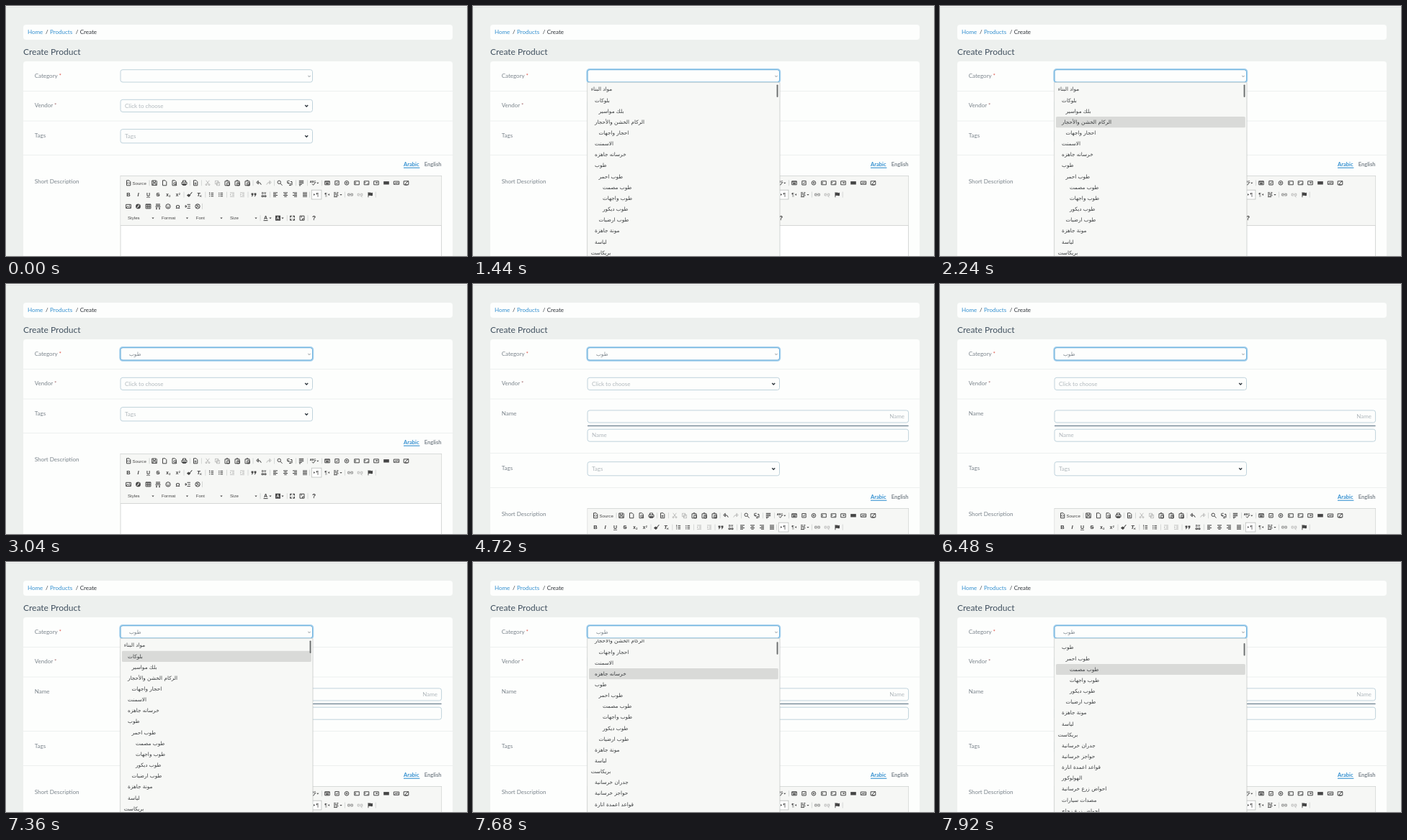
An HTML page for the animation above (8 s loop, 640 by 348 pixels).

```html
<!DOCTYPE html>
<html lang="en">
<head>
<meta charset="utf-8">
<title>Create Product</title>
<style>
html, body { margin: 0; width: 100%; height: 100%; overflow: hidden; background: #edf0ee; }
svg { display: block; width: 100%; height: 100%; }
text { font: 8px Lato, sans-serif; fill: #7b848c; }
.link { fill: #3490d0; }
.dark { fill: #2b3036; }
.hint { fill: #b1b8bd; }
.tab { font-size: 7.5px; font-weight: 700; }
.ar { font: 7.3px "DejaVu Sans", "Noto Sans", sans-serif; fill: #3a3d3f; }
.ed { font: 6.1px "Liberation Sans", Arial, sans-serif; fill: #484848; }
.ic { fill: none; stroke: #454545; stroke-width: 1; }
.ic.solid { fill: #454545; stroke: none; }
.pale { opacity: .3; }
.field { fill: #fdfefd; stroke: #b9cfd9; stroke-width: .9; }
.line { stroke: #edf0ef; stroke-width: 1; }
.sep { stroke: #cfd1d0; stroke-width: .8; }
</style>
</head>
<body>
<svg id="stage" viewBox="0 0 640 348" xmlns="http://www.w3.org/2000/svg"></svg>
<script>
const LOOP = 8000, STEP = 80;
const ROW = 15.15, LIST_TOP = 108.6, SHIFT = 76;

const rect = (x, y, w, h, extra = '') =>
  `<rect x="${x}" y="${y}" width="${w}" height="${h}" ${extra}/>`;
const text = (x, y, s, cls = '', extra = '') =>
  `<text x="${x}" y="${y}" class="${cls}" ${extra}>${s}</text>`;
const path = (d, extra) => `<path d="${d}" ${extra}/>`;
const field = (x, y, w, h) => rect(x, y, w, h, 'rx="3" class="field"');
const rule = y => path(`M24 ${y}H620`, 'class="line"');
const chevron = (x, y) => path(`M${x - 2} ${y - 1}l2 2 2-2`,
  'fill="none" stroke="#30383f" stroke-width="1.4"');
const icon = (x, y, d, cls = '') =>
  path(d, `class="ic ${cls}" transform="translate(${x} ${y})"`);
const seps = (y, list) => list.map(x => path(`M${x} ${y - 4}v8`, 'class="sep"')).join('');
const arrow = (x, y) => icon(x, y, 'M-1.6-.6h3.2l-1.6 1.8z', 'solid');
const glyph = (x, y, s, size, extra = '') =>
  text(x, y, s, 'ed', `text-anchor="middle" style="font-size:${size}px;fill:#3d3d3d;${extra}"`);

const page = 'M-2.5-3.5h3.5l1.8 1.8v5.2h-5.3z';
const clip = 'M-3-2.5h6v6h-6zM-1.2-3.5h2.4M-.2-.3h3.5v3.8h-3.5z';
const box = 'M-3.3-2.5h6.6v5h-6.6z';
const turn = 'M3.3 2.5q-.5-3.5-4.8-3.3M-.8-3l-2.5 2.3 2.5 2.3z';
const chain = 'M-.5-1.4h-2.8v2.8h2.8M.5-1.4h2.8v2.8h-2.8M-1.7 0h3.4';
const bars = (a, b) => `M-3-2.7h6M${a}-.9h${b}M-3 .9h6M${a} 2.7h${b}`;
const circle = r => `M${-r} 0a${r} ${r} 0 1 0 ${2 * r} 0a${r} ${r} 0 1 0 ${-2 * r} 0z`;

function rowOne(y) {
  return icon(170, y, page + 'M-.5-1l-1 1.2 1 1.2M.8-1l1 1.2-1 1.2') + text(175.5, y + 2.2, 'Source', 'ed') +
    icon(206, y, 'M-3.3-3.3h5.8l.8.8v5.8h-6.6zM-1.7-3v2.2h3.2v-2.2M-2 3v-2.2h4v2.2') +
    icon(220, y, page) +
    icon(233.5, y, page + 'M-.5.8a1.5 1.5 0 1 0 3 0a1.5 1.5 0 1 0-3 0M2 2l1.6 1.6') +
    icon(247.5, y, 'M-3.5-1h7v3h-7zM-2-1v-2.3h4v2.3M-2 3.2h4v-2h-4z') +
    icon(263, y, page + 'M-1.3 0h2.6M-1.3 1.6h2.6') +
    icon(280, y, 'M-2.3-3.5l3.6 5M2.3-3.5l-3.6 5M-3 2.4a1 1 0 1 0 2 0a1 1 0 1 0-2 0M1 2.4a1 1 0 1 0 2 0a1 1 0 1 0-2 0', 'pale') +
    icon(293.5, y, 'M-3-3h4v4.5h-4zM-1-1h4v4.5h-4z', 'pale') +
    icon(307, y, clip) + icon(321, y, clip + 'M.8 1h1.8') + icon(335, y, clip + 'M.8 2h1.8') +
    icon(351, y, turn) +
    `<g transform="translate(365 ${y}) scale(-1 1)">${icon(0, 0, turn, 'pale')}</g>` +
    icon(380, y, 'M-3-1a2.2 2.2 0 1 0 4.4 0a2.2 2.2 0 1 0-4.4 0M1 .8l2.5 2.6', '" stroke-width="1.4') +
    icon(394, y, 'M-3.3-3v3.2h2M-2.6-3h2.2M1-1.8h2v4.8M-.5 1.5h2.8M-1 3.3h3M-2-1l1 1.3-1 1.2') +
    icon(410, y, 'M-3.2-3h6.4M-3.2-1.3h6.4M-3.2.4h6.4M-3.2 2.1h4M-3 3.6h2') +
    glyph(426, y - .3, 'ABC', 4, 'font-weight:700') + icon(427, y, 'M-2 1.2l1.6 1.8 3.2-4') + arrow(432.8, y) +
    icon(446, y, box + 'M-3-1.5h6M-2 0h4M-2 1.4h4') +
    icon(459.5, y, 'M-2.7-2.7h5.4v5.4h-5.4zM-1.4 0l1.1 1.2 1.8-2.3') +
    icon(473, y, circle(2.8) + circle(.9)) +
    icon(487, y, box + 'M-1.8-1.4v2.8') +
    icon(500.5, y, box + 'M-1.8-1.2v1.6M1 1.8l1.6-1.6') +
    icon(514, y, box + 'M-.5-.5h2.2l-1.1 1.2z') +
    icon(528, y, 'M-3.8-2.2h7.6v4.4h-7.6z', 'solid') +
    icon(542, y, 'M-3.7-2.2h7.4v4.2h-7.4zM-2.5 1.2l1.5-1.6 1.2 1 1.2-1.3 1.3 1.6') +
    icon(555.5, y, 'M-3.3-2.5h6.6v5h-6.6zM-1.5 1.8l4.6-5M-2 2.8l4 0') +
    seps(y, [199, 255.5, 271.5, 343, 372.5, 402.5, 418.5, 438.5]);
}

function rowTwo(y) {
  const b = y + 2.6, list = 'M-.5-2.2h3.6M-.5 0h3.6M-.5 2.2h3.6';
  const dent = 'M-3-2.7h6M0-.9h3M0 .9h3M-3 2.7h6';
  return glyph(170, b, 'B', 7.5, 'font-weight:700') +
    glyph(183.5, b, 'I', 7.5, 'font-weight:700;font-style:italic') +
    glyph(197.5, b - .3, 'U', 7, 'font-weight:700;text-decoration:underline') +
    glyph(211, b, 'S', 7.5, 'font-weight:700;text-decoration:line-through') +
    glyph(224, b - .4, 'x', 6.5, 'font-weight:700') + glyph(227.2, b + 1, '2', 3.8, 'font-weight:700') +
    glyph(237.6, b, 'x', 6.5, 'font-weight:700') + glyph(240.8, b - 2.6, '2', 3.8, 'font-weight:700') +
    icon(254.5, y, 'M3.4-3.6l-3 3.6-1.7-1.1-2.3 2.3 3 2.2 2.3-2.2-.4-1 3-3.2z', 'solid') +
    glyph(267.3, b, 'T', 7.5, 'font-style:italic;font-weight:700') + icon(270.2, y + 2, 'M-1-1l2 2M1-1l-2 2') +
    icon(285, y, list + 'M-2.4-3.2v1.8M-3-.2h1.2M-3 2.2h1.2') +
    icon(298, y, list + 'M-3-2.2h1.4M-3 0h1.4M-3 2.2h1.4') +
    icon(314, y, dent + 'M-1.5-1l-1.5 1 1.5 1', 'pale') +
    icon(328, y, dent + 'M-3-1l1.5 1-1.5 1', 'pale') +
    icon(344, y, 'M-3.4-2.2h2.8v2.4l-1.6 2.4h-.9l.8-2.2h-1.1zM.6-2.2h2.8v2.4l-1.6 2.4h-.9l.8-2.2h-1.1z', 'solid') +
    glyph(358, y - .2, 'DIV', 3.8, 'font-weight:700') + icon(358, y, 'M-3 1.2h2.4v1.8h-2.4zM.8 1.2h2.2v1.8h-2.2z') +
    icon(374, y, bars(-3, 4)) + icon(388, y, bars(-1.7, 3.4)) +
    icon(401, y, bars(-1, 4)) + icon(415, y, bars(-3, 6)) +
    rect(424.3, y - 6.4, 13.6, 12.8, 'fill="#fff" stroke="#bcbebd" stroke-width=".8"') +
    glyph(432.3, b, '¶', 6.8) + icon(428, y, 'M-1-1.5l2 1.5-2 1.5z', 'solid') +
    glyph(444, b, '¶', 6.8) + icon(448, y, 'M1-1.5l-2 1.5 2 1.5z', 'solid') +
    icon(458, y, 'M-3-2.8h3M1-2.8h2.5M-3-.8h6M-3 1.2h2M0 1.2h3.5M-3 3h5') + arrow(465, y) +
    `<g opacity=".6">${icon(478, y, chain)}</g>` + icon(491.5, y, chain + 'M1 2l2 1.5', 'pale') +
    icon(505.5, y, 'M-3-3.4h.9v.6q1.6-.8 3 0t2.6-.2v4.2q-1.3.9-2.6.2t-3 0v2.2h-.9z', 'solid') +
    seps(y, [247, 276.8, 306.5, 336, 366.5, 421.5, 470.5, 513.3]);
}

function rowThree(y) {
  return icon(170, y, 'M-3.4-2.6h6.8v5.2h-6.8zM-3 2l2-2.3 1.5 1.5 1.2-1 1.6 1.8M1-1.2h1') +
    icon(183.5, y, circle(3.4), 'solid') +
    path(`M185.3 ${y - 2}q-1.6 0-1.9 2t-2 2M182.6 ${y}h2`, 'fill="none" stroke="#f6f7f5" stroke-width=".9"') +
    icon(197.5, y, 'M-3.4-3h6.8v6h-6.8zM-3.4-2.2h6.8M-3.4.4h6.8M-1.1-2v5M1.2-2v5') +
    icon(211, y, 'M-3-3h6M-3-1.3h6M-3.6.4h7.2M-3 2.1h2M1 2.1h2M-3 3.6h2M1 3.6h2') +
    icon(225, y, circle(3.2) + 'M-1.2-1.3v.8M1.2-1.3v.8M-1.6.7q1.6 1.8 3.2 0') +
    glyph(238.5, y + 2.7, 'Ω', 7.6, 'font-weight:700') +
    icon(252.5, y, 'M-1-2.6h4.4M0 0h3.4M-1 2.6h4.4M-3.4-1.4l2 1.4-2 1.4z') +
    icon(266, y, circle(3.2) + 'M-2-1.8l2 1 1.5-1.6M-1.6 2l1-1.7 2.4.5.6 1') +
    seps(y, [272.5]);
}

function rowFour(y) {
  const combos = [['Styles', 169, 204], ['Format', 216, 251.5], ['Font', 263.7, 299], ['Size', 311, 347]];
  return combos.map(([s, x, a]) => text(x, y + 2.2, s, 'ed') + arrow(a, y)).join('') +
    glyph(360.5, y + 1.9, 'A', 7, 'font-weight:700') + icon(360.5, y, 'M-3 3.4h6') + arrow(367, y) +
    icon(377.5, y, 'M-3.5-3.5h7v7h-7z', 'solid') +
    glyph(377.5, y + 2.2, 'A', 6, 'font-weight:700;fill:#fff') + arrow(384, y) +
    icon(397.5, y, 'M-3-.6v-2.4h2.4M3-.6v-2.4h-2.4M-3 .6v2.4h2.4M3 .6v2.4h-2.4M-3-3l2 2M3-3l-2 2M-3 3l2-2M3 3l-2-2') +
    icon(411, y, 'M-3-3h6v6h-6zM.5 3v-2h2.5M-1.8-1.4h2') +
    glyph(427.5, y + 3, '?', 8.4, 'font-weight:700') +
    seps(y, [353, 390.3, 419]);
}

const items = [
  [0, 'مواد البناء'], [1, 'بلوكات'], [2, 'بلك مواسير'], [1, 'الركام الخشن والأحجار'],
  [2, 'احجار واجهات'], [1, 'الاسمنت'], [1, 'خرسانه جاهزه'], [1, 'طوب'], [2, 'طوب احمر'],
  [3, 'طوب مصمت'], [3, 'طوب واجهات'], [3, 'طوب ديكور'], [2, 'طوب ارضيات'], [1, 'مونة جاهزة'],
  [1, 'لياسة'], [0, 'بريكاست'], [1, 'جدران خرسانية'], [1, 'حواجز خرسانية'],
  [1, 'قواعد اعمدة انارة'], [1, 'الهولوكور'], [1, 'احواض زرع خرسانية'],
  [1, 'مصدات سيارات'], [1, 'احواض زرع زجاج']
];

const header =
  rect(0, 0, 640, 348, 'fill="#edf0ee"') + rect(0, 0, 640, 1.2, 'fill="#fbfcfb"') +
  rect(0, 1.2, 640, 1, 'fill="#e2e5e3"') +
  rect(24, 26, 596, 21, 'rx="4" fill="#fdfefd"') +
  text(30, 39, 'Home', 'link') + text(55, 39, '/', 'dark') +
  text(61, 39, 'Products', 'link') + text(96.8, 39, '/', 'dark') + text(102.8, 39, 'Create', 'dark') +
  text(24, 68.2, 'Create Product', '', 'style="font-size:12px;fill:#40505f"') +
  rect(24, 77, 596, 290, 'rx="4" fill="#fdfefd"');

const form =
  rule(118.5) + rule(160) +
  text(39.7, 99.8, 'Category <tspan fill="#d9483b">*</tspan>') +
  text(39.7, 141.4, 'Vendor <tspan fill="#a0686a">*</tspan>') +
  field(159, 88.7, 266.5, 17.3) +
  path('M419.4 97l1.6 1.6 1.6-1.6', 'fill="none" stroke="#777f85" stroke-width=".9"') +
  text(171, 99.8, 'طوب', 'ar', 'id="chosen" style="fill:#7b848c"') +
  field(159, 130.3, 266.5, 17.2) + text(165, 141.6, 'Click to choose', 'hint') + chevron(417.2, 139);

const names =
  text(39.7, 183.2, 'Name') +
  field(159, 175.9, 445.6, 17) + text(599, 187, 'Name', 'hint', 'text-anchor="end"') +
  path('M159 197.5H604.6', 'stroke="#536b7d" stroke-width="1.1"') +
  field(159, 202.2, 445.6, 17) + text(165, 213.4, 'Name', 'hint') + rule(235.5);

const lower =
  text(39.7, 183.2, 'Tags') +
  field(159, 171.6, 266.5, 19.2) + text(165, 184.2, 'Tags', 'hint') + chevron(417.2, 181.2) +
  rule(207.5) +
  text(552, 222.6, 'Arabic', 'tab link') + path('M552 225.2h22.4', 'stroke="#3490d0" stroke-width="1.1"') +
  text(580.8, 222.6, 'English', 'tab') +
  text(39.7, 247.3, 'Short Description') +
  rect(159, 236.5, 445.6, 130, 'fill="#fff" stroke="#d1d3d2" stroke-width=".9"') +
  rect(159.4, 236.9, 444.8, 68.4, 'fill="#f6f7f5"') +
  path('M159 305.5H604.6', 'stroke="#d1d3d2" stroke-width=".9"') +
  rowOne(246.3) + rowTwo(262.6) + rowThree(278.9) + rowFour(295.2);

const rows = items.map(([depth, s], i) =>
  text(163.7 + depth * 5.4, 118.4 + i * ROW, s, 'ar')).join('');

const popup =
  rect(157.8, 107, 269, 250, 'fill="#000" opacity=".07"') +
  rect(158.7, 106.4, 267.2, 250, 'fill="#f7f8f6" stroke="#d3d6d5" stroke-width=".8"') +
  `<g clip-path="url(#view)"><g id="rows">${rect(161, 0, 262.8, ROW, 'id="hover" rx="1.5" fill="#d9dad8"')}${rows}</g></g>` +
  rect(421.6, 0, 1.9, 17.5, 'id="thumb" rx=".9" fill="#6b6e6e"');

document.getElementById('stage').innerHTML =
  `<defs><clipPath id="view">${rect(158, 108, 268, 240)}</clipPath></defs>` +
  header + form + `<g id="names">${names}</g><g id="lower">${lower}</g>` +
  `<g id="ring" fill="none">${rect(0, 0, 0, 0, 'rx="3.8" stroke="#a9d2ee" stroke-width="1.7"')}` +
  `${rect(0, 0, 0, 0, 'rx="3" stroke="#6cb2df" stroke-width="1"')}</g>` +
  `<g id="popup">${popup}</g>`;

const el = id => document.getElementById(id);
const [names$, lower$, ring, list, hover, rows$, thumb, chosen] =
  ['names', 'lower', 'ring', 'popup', 'hover', 'rows', 'thumb', 'chosen'].map(el);
const show = (node, on) => node.setAttribute('visibility', on ? 'inherit' : 'hidden');
const clamp = v => Math.max(0, Math.min(1, v));
const mix = (a, b, t, from, to) => a + (b - a) * clamp((t - from) / (to - from));

const boxes = {
  select: [159, 88.7, 266.5, 17.3],
  first: [159, 175.9, 445.6, 17],
  second: [159, 202.2, 445.6, 17]
};

function focusAt(t) {
  if (t < 800) return null;
  if (t >= 5680 && t < 6240) return 'first';
  if (t >= 6240 && t < 6480) return 'second';
  return 'select';
}

function setRing(name) {
  show(ring, name);
  if (!name) return;
  const [x, y, w, h] = boxes[name];
  [...ring.children].forEach((r, i) => {
    const pad = i ? 0 : .9;
    r.setAttribute('x', x - pad);
    r.setAttribute('y', y - pad);
    r.setAttribute('width', w + 2 * pad);
    r.setAttribute('height', h + 2 * pad);
  });
}

// Pointer height over the open list; null while no row is lit.
function pointerAt(t) {
  if (t < 2000) return null;
  if (t < 2560) return mix(115, 222, t, 2000, 2480);
  if (t < 7200) return LIST_TOP + 7.5 * ROW;
  return t < 7360 ? mix(112, 131, t, 7200, 7360) : mix(131, 149, t, 7360, 7520);
}

function draw(now) {
  const t = Math.floor(now % LOOP / STEP) * STEP;
  const grown = t >= 4720;
  show(names$, grown);
  lower$.setAttribute('transform', `translate(0 ${grown ? SHIFT : 0})`);
  show(chosen, t >= 2720);
  setRing(focusAt(t));

  const open = (t >= 1440 && t < 2560) || t >= 7120;
  show(list, open);
  if (!open) return;
  const scroll = mix(0, 103, t, 7440, 7920);
  const y = pointerAt(t);
  show(hover, y !== null);
  if (y !== null) {
    const row = Math.floor((y + scroll - LIST_TOP) / ROW);
    hover.setAttribute('y', LIST_TOP + row * ROW);
  }
  rows$.setAttribute('transform', `translate(0 ${-scroll})`);
  thumb.setAttribute('y', 109.4 + scroll * .035);
}

function tick() {
  draw(performance.now());
  requestAnimationFrame(tick);
}
tick();
</script>
</body>
</html>
```
